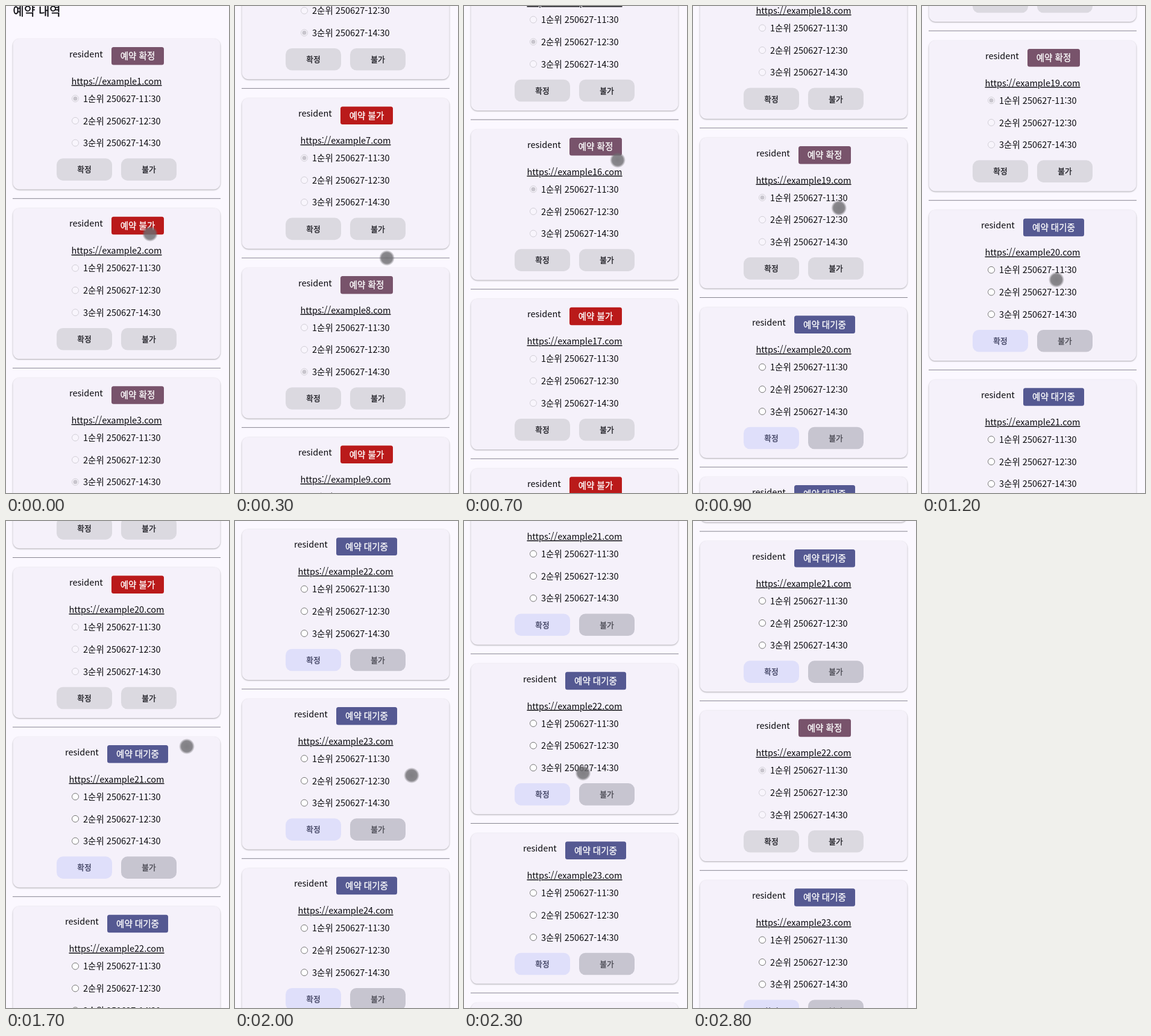
An HTML page that plays this animation: 370x806 px, repeating every 2900 ms.

```html
<!DOCTYPE html>
<html lang="ko">
<head>
<meta charset="utf-8">
<title>예약 내역</title>
<style>
  html, body { margin: 0; width: 100%; height: 100%; overflow: hidden; background: #fbf8ff; }
  svg { display: block; width: 370px; height: 806px; }
  text {
    font: 14.54px "Noto Sans CJK KR", "Noto Sans KR", "Noto Sans CJK", "Noto Sans CJK JP", sans-serif;
    font-variant-ligatures: none;
    font-feature-settings: "calt" 0;
    fill: #0a0a0e;
  }
  .title { font-size: 20px; }
  .url { text-decoration: underline; }
  .mid { text-anchor: middle; }
  .badge { fill: #fff; }
  .btn { font-size: 12.73px; }
  .title, .badge, .btn { stroke: currentColor; stroke-width: .3px; }
  .card { fill: #f5f1fa; filter: drop-shadow(0 1px 1px rgba(0, 0, 0, .32)); }
</style>
</head>
<body>
<svg viewBox="0 0 370 806">
  <defs>
    <radialGradient id="touch">
      <stop offset="0" stop-color="#6d6c70" stop-opacity=".86"/>
      <stop offset=".7" stop-color="#6d6c70" stop-opacity=".8"/>
      <stop offset="1" stop-color="#6d6c70" stop-opacity="0"/>
    </radialGradient>
  </defs>
  <g id="list"></g>
  <circle id="finger" r="13" fill="url(#touch)"/>
</svg>
<script>
const LOOP = 2900, STEP = 100, PITCH = 280.6, TOP = 54;
const list = document.getElementById('list');
const finger = document.getElementById('finger');

// One letter per card: 1-3 confirmed choice, 0 refused, r refused with a choice, w waiting
const START = '1030' + '23r3' + '0102' + '0121' + '001' + 'wwwwww';
const TIMES = ['11:30', '12:30', '14:30'];
const BADGES = {
  ok: ['예약 확정', '#78536b', 87],
  no: ['예약 불가', '#ba1a1a', 87],
  wait: ['예약 대기중', '#555992', 101]
};

// The list rests while a button is pressed, then scrolls on
const scrollKeys = [[0, 0], [300, 1585.3], [700, 4059], [1000, 5047.8],
  [1500, 5047.8], [1700, 5309], [2000, 5933.2], [2100, 5933.2], [2400, 5633], [2900, 5633]];
const fingerKeys = [[0, 239, 377], [300, 252, 417], [700, 255, 255], [1200, 223, 453],
  [1300, 237, 553], [1400, 237, 553], [1700, 300, 373], [2000, 293, 421], [2200, 280, 421],
  [2400, 115, 413], [2500, 115, 413], [2600, 130, 530], [2800, 370, 530], [2900, 370, 530]];

const segment = (keys, t) => {
  let i = 0;
  while (i < keys.length - 2 && t >= keys[i + 1][0]) i++;
  return i;
};

function linear(keys, t, col) {
  const i = segment(keys, t), a = keys[i], b = keys[i + 1];
  return a[col] + (b[col] - a[col]) * (t - a[0]) / (b[0] - a[0]);
}

// Monotone cubic, so the list never overshoots a resting place
function smooth(keys, t) {
  const rate = i => (keys[i + 1][1] - keys[i][1]) / (keys[i + 1][0] - keys[i][0]);
  const slope = i => {
    if (i === 0 || i === keys.length - 1) return 0;
    const p = rate(i - 1), q = rate(i);
    return p * q <= 0 ? 0 : 2 * p * q / (p + q);
  };
  const i = segment(keys, t), [t0, y0] = keys[i], [t1, y1] = keys[i + 1];
  const h = t1 - t0, u = (t - t0) / h, v = 1 - u;
  return y0 * (1 + 2 * u) * v * v + h * slope(i) * u * v * v
    + y1 * u * u * (3 - 2 * u) - h * slope(i + 1) * u * u * v;
}

const rect = (x, y, w, h, r, fill) =>
  `<rect x="${x}" y="${y}" width="${w}" height="${h}" rx="${r}" fill="${fill}"/>`;
const text = (x, y, cls, str, fill) =>
  `<text x="${x}" y="${y}" class="${cls}"${fill ? ` style="fill:${fill};color:${fill}"` : ''}>${str}</text>`;

function radio(y, on, live) {
  const line = live ? (on ? '#0075ff' : '#767676') : '#d2cfd7';
  const dot = live ? '#0075ff' : '#c8c5cd';
  return `<circle cx="115" cy="${y}" r="5.5" fill="${live ? '#fff' : '#f8f5fc'}" stroke="${line}"/>`
    + (on ? `<circle cx="115" cy="${y}" r="3.5" fill="${dot}"/>` : '');
}

function stateOf(n, t) {
  if (n === 20 && t >= 1400) return { kind: 'no', pick: 0 };
  if (n === 22 && t >= 2500) return { kind: t >= 2700 ? 'ok' : 'wait', pick: 1 };
  const c = START[n - 1];
  if (c === 'w') return { kind: 'wait', pick: 0 };
  if (c === 'r') return { kind: 'no', pick: 1 };
  return { kind: c === '0' ? 'no' : 'ok', pick: +c };
}

function card(n, y, t) {
  const { kind, pick } = stateOf(n, t);
  const [label, color, width] = BADGES[kind];
  const live = kind === 'wait';
  const left = live ? 168 : 175;
  let out = `<g transform="translate(0 ${y.toFixed(2)})">`
    + '<rect class="card" x="11.5" y="0" width="344" height="249.5" rx="11"/>'
    + rect(11, 264.2, 345, 1, 0, '#86848f')
    + text(left - 70, 30.8, '', 'resident')
    + rect(left, 14.1, width, 29.5, 3.5, color)
    + text(left + width / 2, 34.3, 'mid badge', label, '#fff')
    + text(183.5, 75.8, 'mid url', `https://example${n}.com`);
  TIMES.forEach((time, i) => {
    const cy = 99.2 + i * 36.7;
    out += radio(cy, pick === i + 1, live)
      + text(128, cy + 5.6, '', `${i + 1}순위 250627-${time}`);
  });
  return out
    + rect(84, 198.3, 92, 36.6, 10.5, live ? '#dfdffa' : '#dbd9e0')
    + rect(191, 198.3, 92, 36.6, 10.5, live ? '#c7c5d0' : '#dbd9e0')
    + text(130, 221.4, 'mid btn', '확정', live ? '#3a3c5c' : '#1b1b21')
    + text(237, 221.4, 'mid btn', '불가', live ? '#46464f' : '#1b1b21')
    + '</g>';
}

function draw(t) {
  const pos = smooth(scrollKeys, t);
  let out = pos < 60 ? text(11.5, 15.8 - pos, 'title', '예약 내역', '#0a0a0e') : '';
  for (let n = 1; n <= START.length; n++) {
    const y = TOP + (n - 1) * PITCH - pos;
    if (y > -PITCH && y < 810) out += card(n, y, t);
  }
  list.innerHTML = out;
  finger.setAttribute('cx', linear(fingerKeys, t, 1));
  finger.setAttribute('cy', linear(fingerKeys, t, 2));
  finger.setAttribute('visibility', t < 2800 ? 'visible' : 'hidden');
}

const begin = performance.now();
let last = -1;
function tick() {
  const t = Math.floor((performance.now() - begin) % LOOP / STEP) * STEP;
  if (t !== last) draw(last = t);
  requestAnimationFrame(tick);
}
tick();
</script>
</body>
</html>
```
